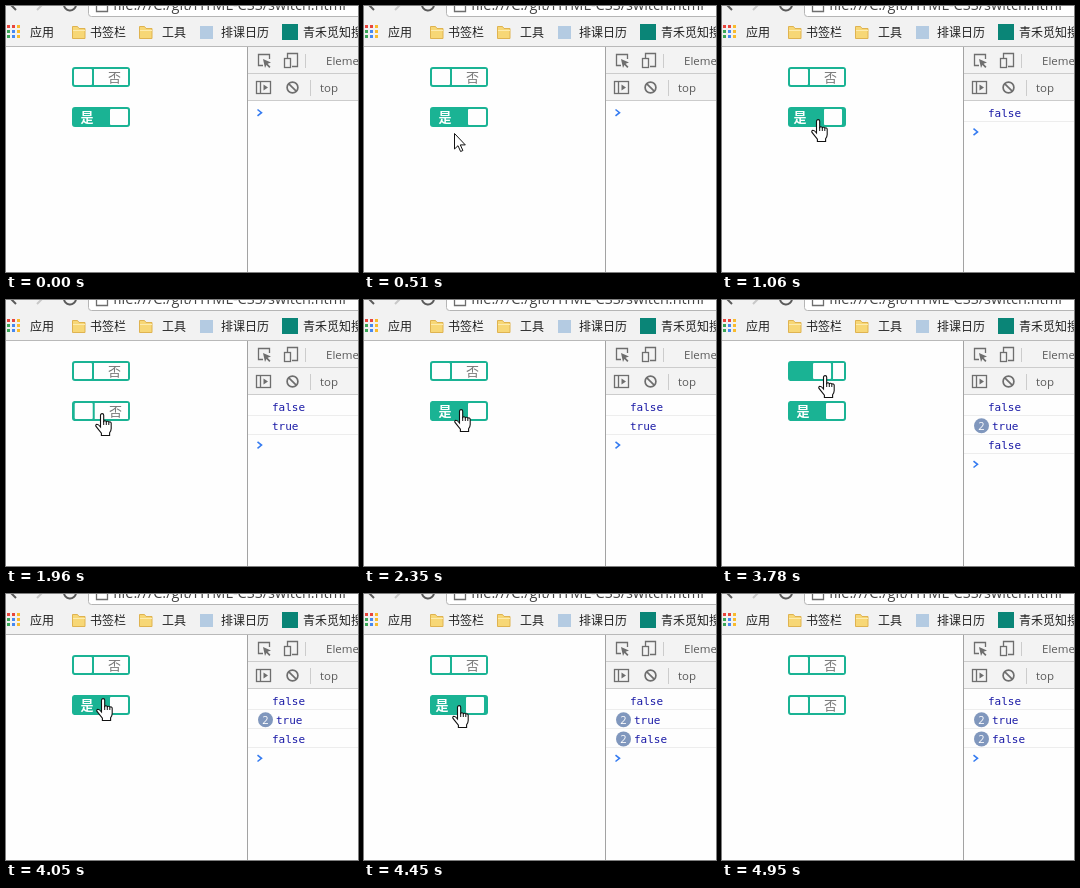
Recreate the animation shown at these times as an HTML page. Size 352 px wide and 266 px high, loop 5230 ms.

```html
<!DOCTYPE html>
<html lang="zh">
<head>
<meta charset="utf-8">
<style>
html, body { margin: 0; width: 100%; height: 100%; overflow: hidden; background: #fefefe; }
svg { display: block; }
text { font: 12px "Noto Sans CJK SC", "Noto Sans CJK", sans-serif; fill: #222; }
.ui { font: 11.5px "Open Sans", sans-serif; fill: #5a5a5a; }
.url { font: 14.5px "Open Sans", sans-serif; fill: #444; }
.log { font: 11px "DejaVu Sans Mono", monospace; fill: #1a1aa6; }
.count { font: 11px "Open Sans", sans-serif; fill: #fff; text-anchor: middle; }
.label { font-size: 13px; }
.icon { fill: none; stroke: #6e6e6e; stroke-width: 1.3; }
.rule { fill: none; stroke: #ccc; }
</style>
</head>
<body>
<svg id="stage" width="352" height="266" viewBox="0 0 352 266">
  <rect width="352" height="41" fill="#f2f2f2"/>
  <path d="M0 40.5H352" stroke="#b9b9b9"/>
  <g fill="none" stroke="#5a5a5a" stroke-width="2">
    <path d="M4 -2L10 4"/>
    <path d="M38 -3L31 4" stroke="#c8c8c8"/>
    <path d="M58 -2A6 6 0 0 0 70 -1"/>
  </g>
  <rect x="82.5" y="-10" width="290" height="20.5" rx="3" fill="#fff" stroke="#b5b5b5"/>
  <path d="M90.5 -2V5.5H101.5V-2" class="icon"/>
  <text x="107" y="4" class="url">file:///C:/git/HTML-CSS/switch.html</text>

  <g id="apps"></g>
  <text x="24" y="31">应用</text>
  <g id="folder">
    <path d="M66.5 20.5h5l1.5 2h6v10h-12.5z" fill="#f7d776" stroke="#dfb350"/>
    <path d="M67 24.5H79" stroke="#fdebae"/>
  </g>
  <use href="#folder" x="67"/>
  <text x="84" y="31">书签栏</text>
  <text x="156" y="31">工具</text>
  <rect x="194" y="20" width="13" height="13" fill="#b4cbe2"/>
  <text x="215" y="31">排课日历</text>
  <rect x="276" y="18" width="16" height="16" fill="#0a8577"/>
  <text x="297" y="31">青禾觅知搜</text>

  <rect x="242" y="41" width="110" height="53" fill="#f3f3f3"/>
  <path class="rule" d="M242 67.5H352M242 94.5H352M299.5 48V62M304.5 74V90"/>
  <path d="M241.5 41V266" stroke="#a3a3a3"/>
  <g class="icon">
    <path d="M257 59.5H252.5V48.5H263.5V53"/>
    <path d="M257 53L265 56.5 261.6 57.8 264.5 60.8 263.3 62 260.4 59 259 62z" fill="#6e6e6e" stroke="none"/>
    <path d="M281.5 52V47.5H291.5V60.5H286"/>
    <rect x="278.5" y="52.5" width="6" height="9"/>
    <rect x="250.5" y="75.5" width="14" height="12"/>
    <path d="M254.5 75V88"/>
    <path d="M257.5 78.5V84.5L262 81.5z" fill="#6e6e6e" stroke="none"/>
    <circle cx="286.5" cy="81.5" r="5.4" stroke-width="1.7"/>
    <path d="M282.8 77.8L290.2 85.2" stroke-width="1.7"/>
  </g>
  <text x="320" y="59" class="ui">Elements</text>
  <text x="314" y="86" class="ui">top</text>

  <g id="console"></g>
  <g id="switches"></g>
  <g id="arrow">
    <path d="M.5 .5V16L4 12.7 6.6 18.5 8.9 17.5 6.3 11.9H11.3z" fill="#fff" stroke="#111"/>
  </g>
  <g id="hand" stroke="#111">
    <path transform="translate(-7 -1)" fill="#fff" stroke-width="1.1" d="M5.5 14V2.2a1.6 1.6 0 0 1 3.2 0V8.3a1.5 1.5 0 0 1 2.6 .4a1.5 1.5 0 0 1 2.5 .6a1.4 1.4 0 0 1 2.4 1V15.5q0 2-1.6 4.2V22.5H6.4V20.2L1 13.4q-.8-1.5 .8-2.1q1.6 0 3.7 2.7z"/>
    <path transform="translate(-7 -1)" d="M8.7 8v4M11.3 9v3M13.8 10v2"/>
  </g>
</svg>
<script>
const LOOP = 5230, GREEN = '#1ab394';
const $ = id => document.getElementById(id);

// Pointer tip: [time, x, y]
const pointer = [
  [0], [270, 91, 214], [390, 89, 168], [510, 90, 127], [660, 95, 118], [790, 96, 114],
  [2350, 97, 110], [2500, 101, 83], [2650, 103, 76], [3900, 94, 84],
  [4050, 97, 105], [4175, 95, 110], [4300, 95, 112],
  [4710, 135, 165], [4830, 199, 236], [4950]
];
// Switches: [time, amount on]
const switches = [
  { y: 61, track: [[0, 0], [2960, .11], [3110, .6], [3230, 1], [3630, .945], [3780, .64], [3900, 0]] },
  { y: 101, track: [[0, 1], [1060, .945], [1220, .6], [1370, 0], [1960, .02], [2110, .36], [2230, .9], [2350, 1],
                    [4450, .945], [4590, .6], [4710, 0]] }
];
const logs = [[1060, 'false'], [1960, 'true'], [2960, 'true'], [3630, 'false'], [4450, 'false']];

const at = (track, t) => track.findLast(step => step[0] <= t);
const move = (el, x, y = 0) => el.setAttribute('transform', `translate(${x} ${y})`);

const dots = ['#e8453c', '#e8453c', '#f9bb2d', '#3aa757', '#4688f1', '#f9bb2d', '#3aa757', '#4688f1', '#f9bb2d'];
$('apps').innerHTML = dots.map((c, i) =>
  `<rect x="${1 + i % 3 * 5}" y="${19 + (i / 3 | 0) * 5}" width="3" height="3" fill="${c}"/>`).join('');

$('switches').innerHTML = switches.map(({ y }) => `
  <svg x="66" y="${y}" width="58" height="20">
    <rect width="58" height="20" rx="3" fill="${GREEN}"/>
    <svg x="2" y="2" width="54" height="16">
      <g><rect width="54" height="16" fill="#fefefe"/>
        <text class="label" x="34" y="12.7" style="fill:#777">否</text></g>
      <g><text class="label" x="6.5" y="12.7" style="fill:#fff;font-weight:bold">是</text></g>
      <g><rect x="-2" width="22" height="16" fill="${GREEN}"/>
        <rect width="18" height="16" rx="1" fill="#fefefe"/></g>
    </svg>
  </svg>`).join('');
const parts = [...document.querySelectorAll('#switches svg svg')].map(s => s.children);

function drawConsole(t) {
  const rows = [];
  for (const [time, text] of logs) {
    if (time > t) break;
    const last = rows.at(-1);
    if (last?.text === text) last.count++;
    else rows.push({ text, count: 1 });
  }
  const y = i => 107 + 19.2 * i;
  $('console').innerHTML = rows.map(({ text, count }, i) => `
    <path d="M242 ${Math.round(y(i) + 8) + .5}H352" stroke="#ededed"/>
    ${count > 1 ? `<circle cx="259.5" cy="${y(i) - .5}" r="7.5" fill="#8097bd"/>
      <text class="count" x="259.5" y="${y(i) + 3.5}">${count}</text>` : ''}
    <text class="log" x="${count > 1 ? 270 : 266}" y="${y(i) + 4}">${text}</text>`).join('') +
    `<path d="M251.5 ${y(rows.length) - 3.5}l4 3.2-4 3.2" fill="none" stroke="#367cf1" stroke-width="1.6"/>`;
}

function drawPointer(t) {
  const [, x, y] = at(pointer, t);
  const over = x > 66 && x < 124 && switches.some(s => y >= s.y && y < s.y + 20);
  for (const [id, shown] of [['hand', over], ['arrow', x && !over]]) {
    $(id).style.display = shown ? '' : 'none';
    if (shown) move($(id), x, y);
  }
}

function draw() {
  const t = performance.now() % LOOP;
  switches.forEach(({ track }, i) => {
    const on = at(track, t)[1], [off, label, knob] = parts[i];
    move(off, 54 * on);
    move(label, 54 * (on - 1));
    move(knob, 36 * on);
  });
  drawConsole(t);
  drawPointer(t);
  requestAnimationFrame(draw);
}
draw();
</script>
</body>
</html>
```
